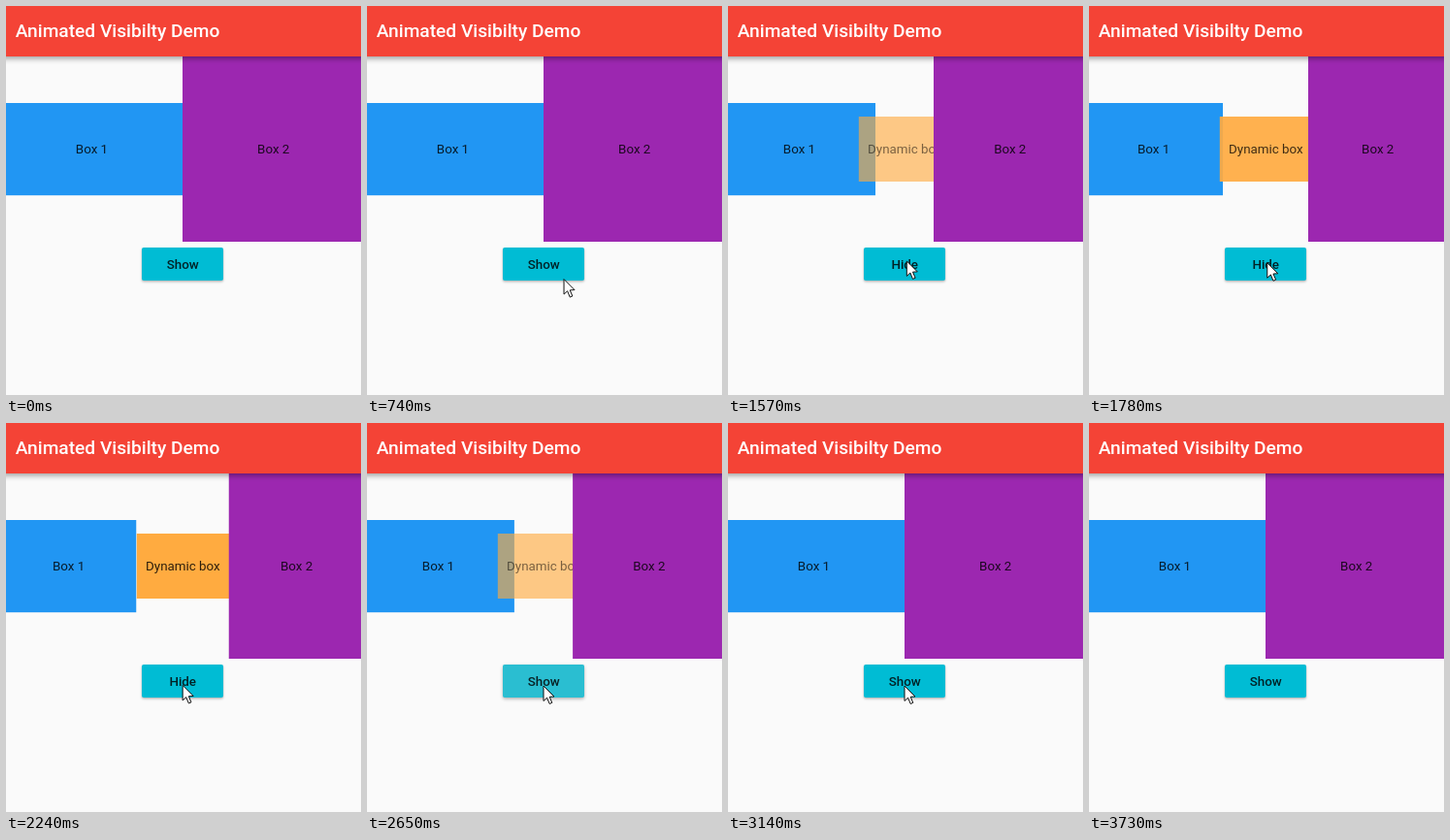
Recreate the animation shown at these times as an HTML page with a canvas. Size 366x401 px, loop 4330 ms.

```html
<!DOCTYPE html>
<html lang="en">
<head>
<meta charset="utf-8">
<title>Animated Visibilty Demo</title>
<style>
html, body { margin: 0; width: 100%; height: 100%; overflow: hidden; background: #fafafa; }
canvas { display: block; width: 366px; height: 401px; }
</style>
</head>
<body>
<canvas id="stage"></canvas>
<script>
const W = 366, H = 401, LOOP = 4330, STEP = 70;
const ENTER = 460, OPEN = 1080, CLOSE = 2510, LEAVE = 3530, GONE = 3730;

const canvas = document.getElementById('stage');
const ctx = canvas.getContext('2d');
const dpr = window.devicePixelRatio || 1;
canvas.width = W * dpr;
canvas.height = H * dpr;

const clamp = v => Math.max(0, Math.min(1, v));
const mix = (a, b, k) => a + (b - a) * k;
const span = (t, start, length) => clamp((t - start) / length);

// Material standard curve: cubic bezier (0.4, 0, 0.2, 1).
function ease(x) {
  let lo = 0, hi = 1;
  for (let i = 0; i < 24; i++) {
    const s = (lo + hi) / 2, r = 1 - s;
    if (1.2 * r * r * s + 0.6 * r * s * s + s * s * s < x) lo = s;
    else hi = s;
  }
  return lo * lo * (3 - 2 * lo);
}

// Holds the picture between steps, counted anew from each action.
function snap(t) {
  const start = [LEAVE, CLOSE, OPEN, ENTER].find(s => t >= s) || 0;
  return start + Math.floor((t - start) / STEP + 0.001) * STEP;
}

function rect(x, y, w, h, color) {
  ctx.fillStyle = color;
  ctx.fillRect(x, y, w, h);
}

function label(text, x, y, weight = 400) {
  ctx.font = `${weight} 13.37px Roboto, sans-serif`;
  ctx.textAlign = 'center';
  ctx.fillStyle = 'rgba(0,0,0,0.82)';
  ctx.fillText(text, x, y);
}

function shadow(alpha, blur, dy) {
  ctx.shadowColor = `rgba(0,0,0,${alpha})`;
  ctx.shadowBlur = blur * dpr;
  ctx.shadowOffsetY = dy * dpr;
}

function drawBoxes(open) {
  const half = 95.5 * open / 2;
  const left = 182 - half, right = 182 + half;
  rect(-5, 100, left + 5, 95.2, '#2196f3');
  label('Box 1', (left - 5) / 2, 152.3);
  if (open > 0) {
    ctx.globalAlpha = open;
    rect(134.8, 114, 95.2, 67, '#ffab40');
    label('Dynamic box', 182.4, 152.3);
    ctx.globalAlpha = 1;
  }
  rect(right, 52, 369.5 - right, 191, '#9c27b0');
  label('Box 2', (right + 369.5) / 2, 152.3);
}

function buttonPath() {
  ctx.beginPath();
  ctx.roundRect(140, 249, 84, 34, 2);
}

function drawButton(t, press, text) {
  const age = t - press.down;
  const strength = age < 0 ? 0 : 1 - span(age, press.hold, 200);
  const lift = strength * strength;
  ctx.save();
  shadow(0.3, mix(2.5, 6, lift), mix(1.2, 2.2, lift));
  buttonPath();
  ctx.fillStyle = '#00bcd4';
  ctx.fill();
  ctx.restore();
  if (strength > 0) {
    ctx.save();
    buttonPath();
    ctx.clip();
    ctx.beginPath();
    ctx.arc(182.7, 264, 8 + age * press.speed, 0, Math.PI * 2);
    ctx.fillStyle = `rgba(200,200,200,${0.4 * strength})`;
    ctx.fill();
    ctx.restore();
  }
  label(text, 182.2, 270.7, 500);
}

function drawBar() {
  ctx.save();
  shadow(0.4, 6, 2);
  rect(-10, -10, W + 20, 62, '#f44336');
  ctx.restore();
  ctx.font = '500 19.15px Roboto, sans-serif';
  ctx.textAlign = 'left';
  ctx.fillStyle = '#fff';
  ctx.fillText('Animated Visibilty Demo', 9.8, 32);
}

// Glides in from the lower right, drifts a little, then speeds away.
function drawPointer(t) {
  const away = Math.pow(1 - span(t, ENTER, 490), 2);
  const drift = span(t, 1640, 600);
  const exit = Math.pow(span(t, LEAVE - STEP, 3 * STEP), 2);
  ctx.save();
  ctx.translate(184.3 + 102 * away - 2.3 * drift + 95 * exit,
                262.4 + 102 * away + 8.1 * drift + 118 * exit);
  ctx.beginPath();
  ctx.moveTo(0, 0.5);
  ctx.lineTo(0, 16);
  ctx.lineTo(3.6, 12.7);
  ctx.lineTo(6.2, 19);
  ctx.lineTo(8.8, 17.9);
  ctx.lineTo(6.2, 11.8);
  ctx.lineTo(11, 11.5);
  ctx.closePath();
  ctx.fillStyle = '#fff';
  ctx.fill();
  ctx.strokeStyle = '#111';
  ctx.stroke();
  ctx.restore();
}

function draw(now) {
  const time = now % LOOP;
  const t = snap(time);
  const open = ease(span(t, OPEN + 160, 810)) - ease(span(t, CLOSE - 5, 482));
  const press = t < CLOSE
    ? { down: OPEN, hold: 210, speed: 0.124 }
    : { down: CLOSE - 60, hold: 105, speed: 0.26 };
  ctx.setTransform(dpr, 0, 0, dpr, 0, 0);
  rect(0, 0, W, H, '#fafafa');
  drawBoxes(open);
  drawButton(t, press, t > OPEN + 160 && t < CLOSE ? 'Hide' : 'Show');
  drawBar();
  if (time >= ENTER && time < GONE) drawPointer(t);
}

const begin = performance.now();
function tick() {
  draw(performance.now() - begin);
  requestAnimationFrame(tick);
}
tick();
</script>
</body>
</html>
```
